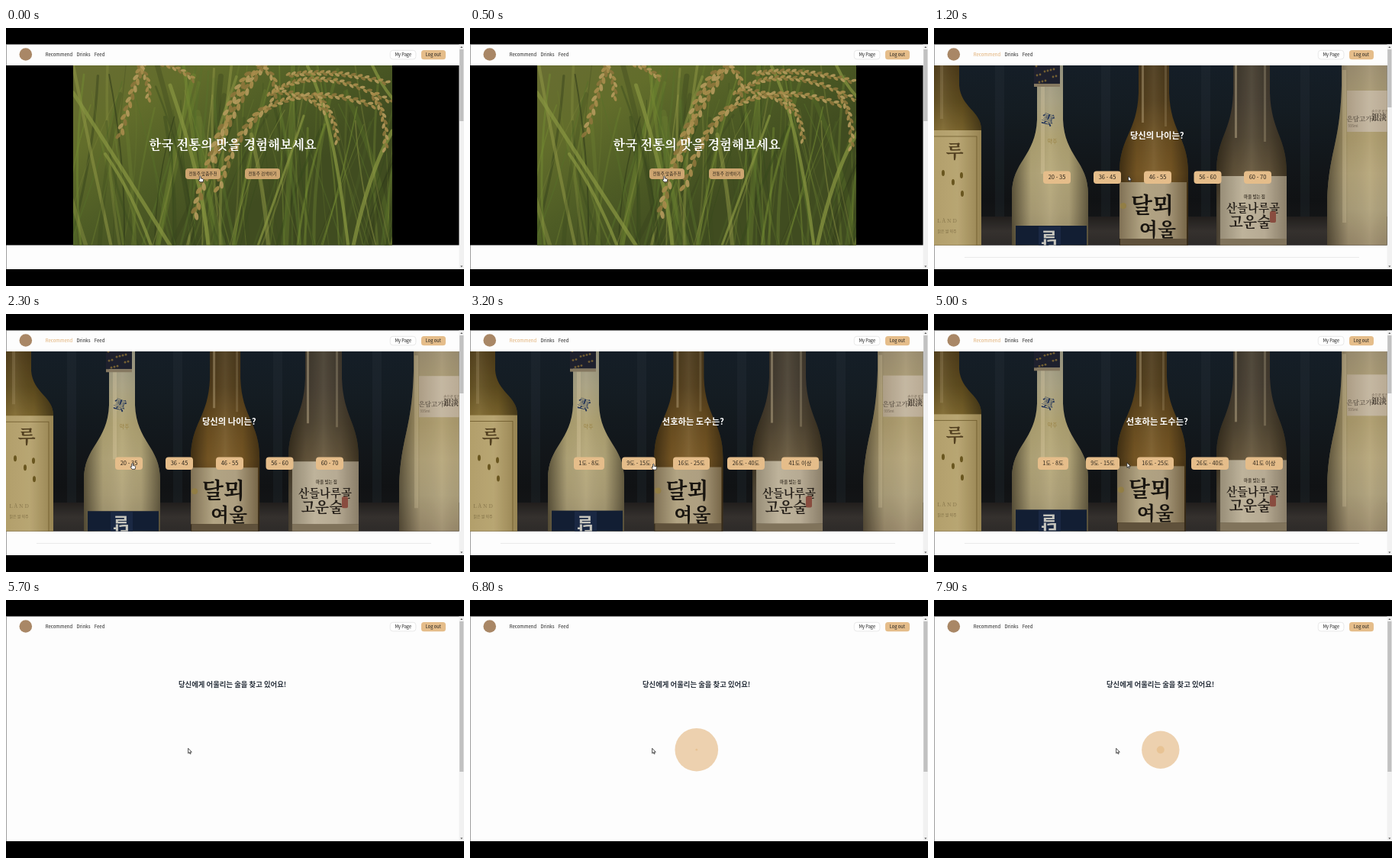
An HTML page with a canvas that plays this animation: 600x338 px, repeating every 8 s.

```html
<!DOCTYPE html>
<html lang="ko">
<head>
<meta charset="utf-8">
<style>
html, body { margin: 0; width: 100%; height: 100%; overflow: hidden; background: #000; }
canvas { display: block; width: 600px; height: 338px; }
</style>
</head>
<body>
<canvas id="stage"></canvas>
<script>
const LOOP = 8000, TO_QUIZ = 800, NEXT_QUESTION = 2600, TO_RESULT = 5600, LOADER_START = 5680;
const SANS = '"Noto Sans CJK KR", "Noto Sans", sans-serif';
const SERIF = '"Noto Serif CJK KR", "Noto Serif", "Noto Sans CJK KR", serif';
const TAN = '#e5bd8a';

const canvas = document.getElementById('stage');
const dpr = window.devicePixelRatio || 1;
canvas.width = 600 * dpr;
canvas.height = 338 * dpr;
const c = canvas.getContext('2d');

// ---------- helpers ----------
function rect(x, y, w, h, fill) {
  c.fillStyle = fill;
  c.fillRect(x, y, w, h);
}
function pill(x, y, w, h, r, fill, line) {
  c.beginPath();
  c.roundRect(x, y, w, h, r);
  c.fillStyle = fill;
  c.fill();
  if (line) { c.strokeStyle = line; c.lineWidth = 0.7; c.stroke(); }
}
function disc(x, y, r, fill) {
  c.beginPath();
  c.arc(x, y, r, 0, 7);
  c.fillStyle = fill;
  c.fill();
}
function text(s, x, y, size, fill, { weight = 400, font = SANS, align = 'center' } = {}) {
  c.font = `${weight} ${size}px ${font}`;
  c.textAlign = align;
  c.textBaseline = 'alphabetic';
  c.fillStyle = fill;
  c.fillText(s, x, y);
}
function gradient(x0, y0, x1, y1, colors) {
  const g = c.createLinearGradient(x0, y0, x1, y1);
  colors.forEach((col, i) => g.addColorStop(i / (colors.length - 1), col));
  return g;
}
function randomFrom(seed) {
  return () => {
    seed = (seed * 16807) % 2147483647;
    return seed / 2147483647;
  };
}
function bezier(p, k) {
  const m = 1 - k;
  const at = i => m * m * p[i] + 2 * m * k * p[i + 2] + k * k * p[i + 4];
  const slope = i => m * (p[i + 2] - p[i]) + k * (p[i + 4] - p[i + 2]);
  return [at(0), at(1), Math.atan2(slope(1), slope(0))];
}
// CSS ease-in-out, solved for x
function easeInOut(x) {
  let lo = 0, hi = 1;
  for (let i = 0; i < 24; i++) {
    const s = (lo + hi) / 2;
    const bx = 3 * (1 - s) * (1 - s) * s * 0.42 + 3 * (1 - s) * s * s * 0.58 + s * s * s;
    if (bx < x) lo = s; else hi = s;
  }
  return lo * lo * (3 - 2 * lo);
}

// ---------- rice field ----------
const rnd = randomFrom(77);
const blades = Array.from({ length: 130 }, () => {
  const x = 70 + rnd() * 450, lean = (rnd() - 0.45) * 150;
  return {
    x, y: 300, tipX: x + lean, tipY: 30 + rnd() * 110, bend: (rnd() - 0.5) * 40,
    width: 1 + rnd() * rnd() * 8, alpha: 0.18 + rnd() * 0.4,
    tone: ['#748a32', '#38491d', '#8f9644', '#57702a', '#2d3818', '#697b30'][Math.floor(rnd() * 6)]
  };
});
const strands = [
  [338, 48, 300, 95, 272, 172, 4.3], [286, 125, 262, 180, 247, 246, 4.6],
  [340, 105, 300, 135, 278, 212, 4.3], [322, 58, 300, 78, 288, 118, 4.2],
  [340, 106, 400, 72, 482, 102, 3.2], [345, 88, 405, 42, 505, 97, 3],
  [370, 62, 425, 52, 500, 72, 3], [405, 88, 430, 105, 434, 150, 3],
  [480, 88, 500, 110, 497, 160, 3.2], [355, 84, 395, 84, 418, 110, 3],
  [330, 50, 360, 60, 350, 95, 3.4], [180, 45, 165, 80, 149, 142, 4],
  [172, 46, 190, 66, 186, 94, 3.2], [200, 46, 230, 52, 246, 68, 3]
];

function drawField(t) {
  const sway = Math.min(t, 900) * 0.005;
  c.save();
  c.beginPath();
  c.rect(88, 49, 418, 235.5);
  c.clip();
  rect(88, 49, 418, 236, gradient(88, 49, 240, 285, ['#686d32', '#626d2b', '#4e5c25', '#404c20']));
  c.lineCap = 'round';
  for (const b of blades) {
    c.globalAlpha = b.alpha;
    c.strokeStyle = b.tone;
    c.lineWidth = b.width;
    c.beginPath();
    c.moveTo(b.x, b.y);
    c.quadraticCurveTo((b.x + b.tipX) / 2 + b.bend, (b.y + b.tipY) / 2, b.tipX + sway, b.tipY);
    c.stroke();
  }
  c.globalAlpha = 0.75;
  // broad leaves in front
  const leaves = [[88, 85, 150, 180, 215, 285, 5], [130, 165, 165, 215, 190, 285, 4],
    [395, 50, 430, 120, 448, 285, 4], [455, 285, 475, 190, 506, 135, 5], [330, 285, 365, 190, 390, 115, 3],
    [265, 285, 258, 200, 215, 75, 5], [480, 49, 492, 75, 506, 92, 4]];
  for (const [x0, y0, x1, y1, x2, y2, w] of leaves) {
    c.strokeStyle = '#86933f';
    c.lineWidth = w;
    c.beginPath();
    c.moveTo(x0, y0);
    c.quadraticCurveTo(x1, y1, x2 + sway, y2);
    c.stroke();
  }
  c.globalAlpha = 0.92;
  c.translate(sway, -sway * 0.7);
  for (const s of strands) {
    c.strokeStyle = '#8d8543';
    c.lineWidth = 1.2;
    c.beginPath();
    c.moveTo(s[0], s[1]);
    c.quadraticCurveTo(s[2], s[3], s[4], s[5]);
    c.stroke();
    const size = s[6], count = Math.round(Math.hypot(s[4] - s[0], s[5] - s[1]) / (size * 1.35));
    for (let i = 0; i <= count; i++) {
      const [x, y, a] = bezier(s, i / count), side = i % 2 ? 1 : -1;
      c.beginPath();
      c.ellipse(x - Math.sin(a) * side * size * 0.55, y + Math.cos(a) * side * size * 0.55,
        size * 1.15, size * 0.58, a + side * 0.4, 0, 7);
      c.fillStyle = ['#a88b4b', '#8d763b', '#b49a5c'][i % 3];
      c.fill();
    }
  }
  c.restore();
}

// ---------- bottles ----------
function bottle(cx, neck, body, top, shoulder, colors) {
  const mid = (top + shoulder) / 2;
  c.beginPath();
  c.moveTo(cx - neck, 30);
  c.lineTo(cx - neck, top);
  c.bezierCurveTo(cx - neck - 2, mid, cx - body, mid + 5, cx - body, shoulder);
  c.lineTo(cx - body, 300);
  c.lineTo(cx + body, 300);
  c.lineTo(cx + body, shoulder);
  c.bezierCurveTo(cx + body, mid + 5, cx + neck + 2, mid, cx + neck, top);
  c.lineTo(cx + neck, 30);
  c.closePath();
  c.fillStyle = gradient(0, 49, 0, 285, colors);
  c.fill();
  c.fillStyle = gradient(cx - body, 0, cx + body, 0,
    ['rgba(20,15,5,.55)', 'rgba(20,15,5,.05)', 'rgba(255,240,200,.1)', 'rgba(20,15,5,.05)', 'rgba(20,15,5,.5)']);
  c.fill();
}
function shine(x, y, w, h, alpha) {
  rect(x, y, w, h, `rgba(255,235,190,${alpha})`);
}
function brush(s, x, y, size, fill) {
  text(s, x, y, size, fill, { weight: 700, font: SERIF });
}

function drawBottles(t) {
  const drift = -0.0007 * (t - 1200);
  c.save();
  c.beginPath();
  c.rect(0, 49, 593.5, 235.5);
  c.clip();
  rect(0, 49, 594, 236, gradient(0, 49, 0, 285, ['#17202a', '#161e25', '#14191d', '#111416', '#1c1b1c']));
  for (const x of [80, 219, 350, 480]) rect(x, 49, 12, 200, 'rgba(65,80,95,.14)');
  rect(0, 247, 594, 38, gradient(0, 247, 0, 285, ['#24211f', '#393532', '#312e2c']));
  c.translate(0, drift);

  bottle(12, 21, 50, 75, 133, ['#513d18', '#64501f', '#8d7434', '#a78e4a', '#a48e50', '#8c7740']);
  shine(8, 49, 4, 70, 0.14);
  rect(-2, 134, 64, 160, gradient(0, 0, 62, 0, ['#c1ad74', '#c8b47d', '#a48f59']));
  c.strokeStyle = '#75602e';
  c.lineWidth = 0.8;
  c.strokeRect(-4, 142, 60, 160);
  brush('루', 27, 170, 24, '#594523');
  for (const [x, y] of [[12, 190], [25, 202], [36, 193], [37, 217]]) {
    c.beginPath();
    c.ellipse(x, y, 2, 4, 0, 0, 7);
    c.fillStyle = '#725d22';
    c.fill();
  }
  text('L A N D', 17, 255, 7, '#8e7b4e', { font: SERIF });
  text('맑은 쌀 약주', 17, 268, 5, '#8e7b4e');

  bottle(152, 17, 50, 120, 218, ['#a4a18d', '#b4ad8c', '#bcae7a', '#c4b685', '#bcae82', '#a99c75']);
  shine(140, 76, 5, 115, 0.25);
  rect(131, 40, 34, 33, '#202331');
  for (let i = 0; i < 12; i++) disc(134 + (i * 11) % 29, 50 + (i * 7) % 22, 1.4, '#7d6737');
  rect(131, 73, 34, 4, '#908268');
  c.save();
  c.translate(149, 120);
  c.rotate(0.35);
  brush('雲', 0, 6, 17, '#273a61');
  c.restore();
  text('약주', 155, 151, 7, '#a68d4b');
  rect(107, 259, 93, 40, '#142037');
  rect(137, 260, 29, 40, '#1c2b49');
  c.save();
  c.translate(151, 276);
  c.rotate(Math.PI);
  text('달', 0, 8, 23, '#d7d6cd', { weight: 700 });
  c.restore();

  const side = -0.0008 * (t - 1200);
  c.save();
  c.translate(side, 0);
  bottle(288, 20, 45, 85, 190, ['#4c3a1c', '#553f1b', '#725423', '#825f28', '#6a4d24', '#5c4a30']);
  shine(272, 49, 3, 75, 0.3);
  shine(302, 49, 3, 80, 0.16);
  rect(243, 202, 88, 74, gradient(243, 0, 331, 0, ['#8b7b5c', '#c1b28e', '#bdad8c', '#82704f']));
  rect(244, 276, 87, 15, '#675840');
  brush('달뫼', 286, 243, 29, '#1b1711');
  brush('여울', 293, 273, 25, '#1b1711');
  disc(248, 233, 4, '#9e894b');
  c.restore();

  bottle(416, 24, 46, 85, 190, ['#443d31', '#494034', '#544936', '#6b5b40', '#91836a', '#91836c']);
  shine(394, 49, 3, 95, 0.35);
  shine(432, 49, 3, 100, 0.22);
  rect(375, 194, 87, 82, gradient(375, 0, 462, 0, ['#a59a82', '#cec2a8', '#c6b9a0', '#968972']));
  rect(375, 276, 87, 15, '#8b7d63');
  text('마을 빚는 집', 420, 223, 5.5, '#4a4033', { weight: 700 });
  brush('산들나루골', 418, 241, 14.5, '#29231c');
  brush('고운술', 414, 261, 19, '#29231c');
  pill(440, 240, 8, 15, 2, '#955244');

  bottle(571, 37, 56, 75, 240, ['#aa9b7b', '#b7a77d', '#baa876', '#c4b385', '#bcae86', '#a69574']);
  shine(535, 55, 5, 200, 0.22);
  rect(541, 82, 60, 54, gradient(541, 0, 600, 0, ['#bbab91', '#d5c7b0', '#c6b69d']));
  text('은담고가', 557, 122, 8.5, '#4a4035', { font: SERIF });
  text('銀淡', 583, 121, 10, '#4a4035', { weight: 700, font: SERIF });
  text('손으로 빚은', 584, 111, 4.5, '#796a58');
  text('935ml', 549, 130, 4.5, '#796a58');
  c.restore();

  rect(0, 49, 593.5, 235.5, 'rgba(0,0,0,.08)');
}

// ---------- pages ----------
const row = (labels, xs, y, h, size) => labels.map((label, i) => ({ label, x: xs[i][0], w: xs[i][1], y, h, size }));
const homeButtons = row(['전통주 맞춤추천', '전통주 검색하기'], [[235, 46], [313, 46]], 184, 14, 5.55);
const ageButtons = row(['20 - 35', '36 - 45', '46 - 55', '56 - 60', '60 - 70'],
  [[143, 36], [209, 36], [275, 36], [340.5, 36], [406, 36]], 187.5, 16.5, 7.5);
const proofButtons = row(['1도 - 8도', '9도 - 15도', '16도 - 25도', '26도 - 40도', '41도 이상'],
  [[136, 40], [199, 44], [266, 48], [337, 49], [408, 49]], 187.5, 16.5, 7.3);

function drawButtons(list, fill) {
  for (const b of list) {
    pill(b.x, b.y, b.w, b.h, 4, fill);
    text(b.label, b.x + b.w / 2, b.y + b.h / 2 + b.size * 0.36, b.size, '#2b241b');
  }
}

function drawFrame(thumbEnd, active) {
  rect(0, 0, 600, 338, '#000');
  rect(0, 21.5, 600, 294.5, '#fdfdfd');
  disc(25.8, 34.5, 8.3, '#a98766');
  const left = { align: 'left' };
  text('Recommend', 51.7, 37, 6, active ? '#e0ad70' : '#1d1d1d', left);
  text('Drinks', 92.6, 37, 6, '#1d1d1d', left);
  text('Feed', 115.8, 37, 6, '#1d1d1d', left);
  pill(503.3, 29.3, 33.6, 11.6, 3.5, '#fff', '#dedede');
  text('My Page', 520.3, 37, 5.7, '#1d1d1d');
  pill(544, 29, 32, 12.2, 3.5, TAN);
  text('Log out', 559.8, 37, 5.7, '#1d1d1d');
  rect(593.5, 21.5, 6.5, 294.5, '#f1f1f1');
  rect(594.2, 28, 5.2, thumbEnd - 28, '#c1c1c1');
  for (const [y, d] of [[25, -1], [312.5, 1]]) {
    c.beginPath();
    c.moveTo(595.3, y - d);
    c.lineTo(598.3, y - d);
    c.lineTo(596.8, y + d);
    c.fillStyle = '#555';
    c.fill();
  }
  rect(0, 21.5, 0.7, 294.5, '#777');
}

function drawLoader(t) {
  const age = (t - LOADER_START) * 1.08, half = 1050;
  for (const delay of [half, 0]) {
    const k = age - delay;
    if (k <= 0) continue;
    const p = (k / half) % 2;
    disc(296.8, 196.2, 29.7 * easeInOut(p < 1 ? p : 2 - p), 'rgba(229,187,134,.65)');
  }
}

// ---------- pointer ----------
const moves = [
  [1300, 2100, 254.5, 194, 165.5, 195.5],
  [2800, 3700, 165.5, 195.5, 349.5, 197.5],
  [4400, 5200, 349.5, 197.5, 238.7, 194.3]
];
function pointerAt(t) {
  let x = 254.5, y = 194;
  for (const [from, to, x0, y0, x1, y1] of moves) {
    if (t < from) break;
    const k = easeInOut(Math.min(1, (t - from) / (to - from)));
    x = x0 + (x1 - x0) * k;
    y = y0 + (y1 - y0) * k;
  }
  return [x, y];
}
const ARROW = new Path2D('M0 0V6.6L1.5 5.2L2.5 7.5L3.5 7L2.5 4.9H4.6Z');
const HAND = new Path2D('M-.8 .6Q0-.6 .8 .6V3L3.6 3.6Q4.4 4 4.2 5L3.6 7.8H-.4L-2.4 5Q-2.4 4-1.4 4.2L-.8 4.8Z');
function drawPointer(t, buttons) {
  const [x, y] = pointerAt(t);
  const over = buttons.some(b => x >= b.x && x <= b.x + b.w && y >= b.y && y <= b.y + b.h);
  const shape = over ? HAND : ARROW;
  c.save();
  c.translate(x, y);
  c.lineWidth = 0.8;
  c.lineJoin = 'round';
  c.strokeStyle = '#222';
  c.fillStyle = '#fff';
  c.fill(shape);
  c.stroke(shape);
  c.restore();
}

function draw(t) {
  c.setTransform(dpr, 0, 0, dpr, 0, 0);
  let buttons = [];
  if (t < TO_QUIZ) {
    buttons = homeButtons;
    drawFrame(122, false);
    rect(0, 49, 593.5, 235.5, '#000');
    drawField(t);
    text('한국 전통의 맛을 경험해보세요', 297, 159, 16.5, '#fff', { weight: 700, font: SERIF });
    drawButtons(buttons, '#cda570');
  } else if (t < TO_RESULT) {
    const first = t < NEXT_QUESTION;
    buttons = first ? ageButtons : proofButtons;
    drawFrame(104, true);
    drawBottles(t);
    rect(40, 300, 517, 0.8, '#e6e6e6');
    text(first ? '당신의 나이는?' : '선호하는 도수는?', 292.3, 145, 11.3, '#fff', { weight: 900 });
    drawButtons(buttons, TAN);
  } else {
    drawFrame(225, false);
    text('당신에게 어울리는 술을 찾고 있어요!', 296.6, 113.5, 9.4, '#2a323d', { weight: 900 });
    drawLoader(t);
  }
  drawPointer(t, buttons);
}

const start = performance.now();
function tick() {
  draw((performance.now() - start) % LOOP);
  requestAnimationFrame(tick);
}
tick();
</script>
</body>
</html>
```
